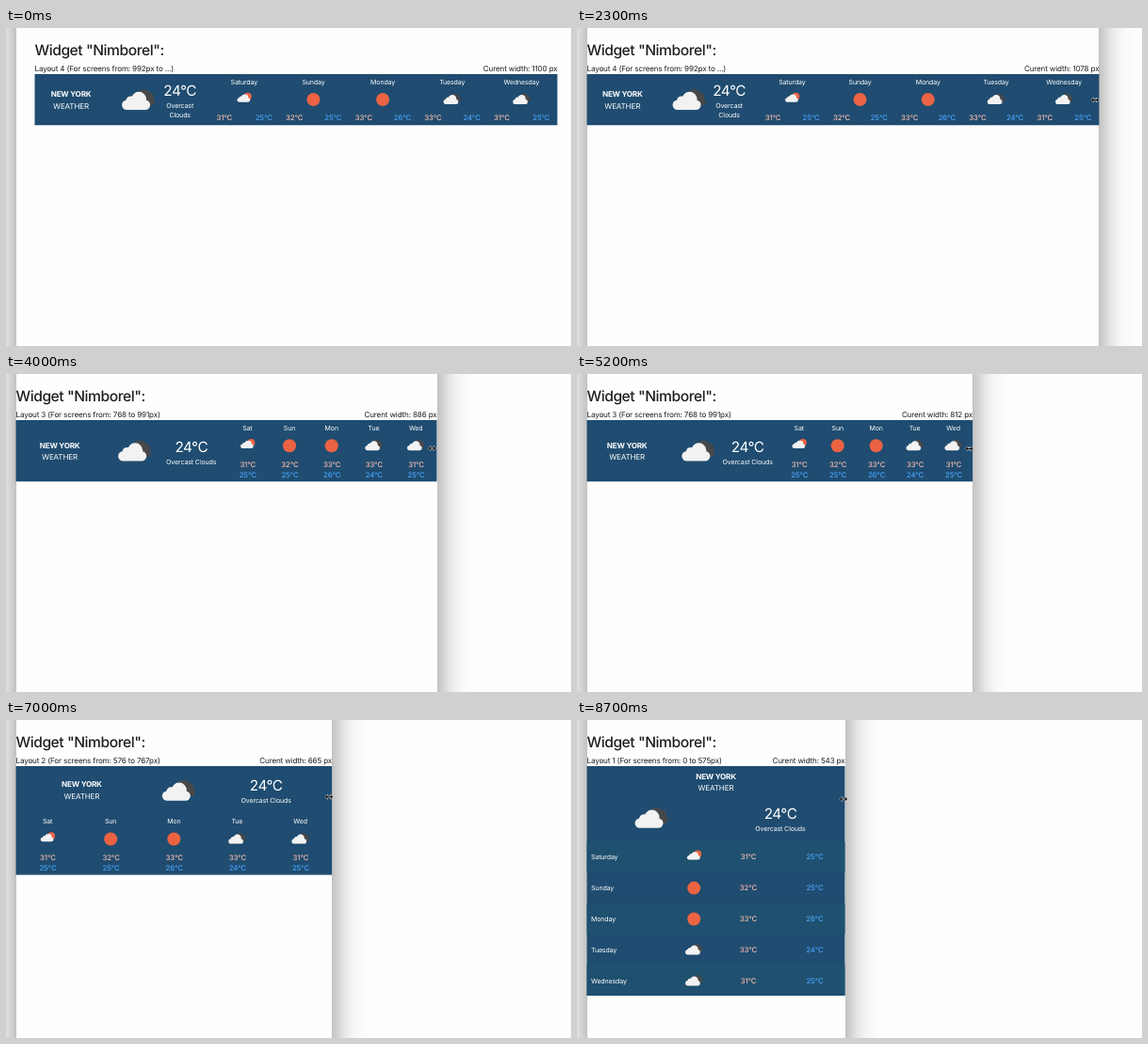
Write an HTML page that moves like this. It is 600x338 px and loops after 8.8 s.

```html
<!DOCTYPE html>
<html lang="en">
<head>
<meta charset="utf-8">
<title>Responsive weather widget</title>
<style>
  html, body { margin: 0; width: 100%; height: 100%; overflow: hidden; background: #fdfdfd; }
  #stage { position: relative; width: 100%; height: 100%; overflow: clip; contain: strict; }
  #page { position: absolute; left: 10.5px; top: -60px; bottom: -60px; background: #fefefe; box-shadow: 0 0 30px rgba(0, 0, 0, .47); }
  svg { position: absolute; left: 0; top: 0; width: 600px; height: 338px; }
  text { font-family: Inter, "Noto Sans", sans-serif; letter-spacing: -.018em; text-rendering: geometricPrecision; white-space: pre; }
  .title { font-size: 15.6px; font-weight: 550; letter-spacing: -.028em; fill: #1b1e21; }
  .note { font-size: 8.07px; fill: #1b1e21; }
  .city { font-size: 8.07px; font-weight: 700; letter-spacing: -.024em; fill: #fff; }
  .sub { font-size: 8.07px; fill: #fff; }
  .now { font-size: 15.4px; letter-spacing: -.035em; fill: #fff; }
  .sky { font-size: 7.06px; fill: #fff; }
  .day { font-size: 7px; fill: #fff; }
  .high { font-size: 7.8px; font-weight: 500; fill: #f6bbae; }
  .low { font-size: 7.8px; font-weight: 500; fill: #48a2fa; }
</style>
</head>
<body>
<div id="stage">
<div id="page"></div>
<svg viewBox="0 0 600 338">
  <defs>
    <g id="white" fill="#f2f2f2">
      <rect x="-17.5" y=".6" width="30" height="10.4" rx="5.2"/>
      <circle cx=".5" cy="-.2" r="8"/>
      <circle cx="-8" cy="1.4" r="5"/>
    </g>
    <g id="clouds" transform="translate(0 -1)">
      <g fill="#47484a">
        <rect x="-5" y="-2.5" width="22.5" height="9" rx="4.5"/>
        <circle cx="5.5" cy="-4" r="7"/>
        <circle cx="11.5" cy="-3" r="4.6"/>
      </g>
      <use href="#white"/>
    </g>
    <circle id="sun" cy=".3" r="7" fill="#eb6343"/>
    <g id="partly">
      <circle cx="4" cy="-3" r="4" fill="#eb6343"/>
      <use href="#white" transform="translate(.7 -1.7) scale(.46 .43)"/>
    </g>
    <use id="small" href="#clouds" transform="translate(0 .2) scale(.52)"/>
    <path id="cursor" d="M-4.2 0 L-1.6 -2.4 V-.5 H1.6 V-2.4 L4.2 0 L1.6 2.4 V.5 H-1.6 V2.4 Z"
      fill="#111" stroke="#fff" stroke-width=".9" paint-order="stroke" stroke-linejoin="round"/>
  </defs>
  <g id="view"></g>
</svg>
</div>
<script>
const LOOP = 8800, STEP = 100, LEFT = 10.5, MAX_W = 555, PX = 1100 / MAX_W;

// time, right window edge, cursor offset from that edge, cursor y
const drag = [
  [0, 605.5, 14, 72], [300, 605.5, 6, 72], [900, 601, -4, 72.5], [1200, 588, -5, 73],
  [1500, 571.5, -5, 73], [1800, 565, -4.5, 75], [2700, 546, -4, 77.5], [3100, 530.7, -3.5, 78],
  [3600, 494, -4.5, 78.5], [4000, 457.5, -5, 79], [4500, 438, -4, 79], [5400, 415, -3.5, 79.5],
  [6200, 373.4, -3, 80.5], [6300, 371, -3, 80.5], [7200, 339, -3, 82], [7900, 321.4, -3.5, 83.5],
  [8100, 306, -3, 83.5], [8700, 284.5, -1.5, 84], [8800, 284.5, -1.5, 84]
];

const days = [
  ["Saturday", "partly", 31, 25], ["Sunday", "sun", 32, 25], ["Monday", "sun", 33, 26],
  ["Tuesday", "small", 33, 24], ["Wednesday", "small", 31, 25]
];

// head: share of the width used by the header; city and temp: centres within it
const layouts = [
  { id: 4, min: 992, range: "992px to ...", bottom: 103.3, head: 1 / 3, city: 5 / 24, temp: 5 / 6, cityY: 70.5, cloudY: 77, tempY: 66.5 },
  { id: 3, min: 768, range: "768 to 991px", bottom: 114.3, head: 1 / 2, city: 5 / 24, temp: 5 / 6, cityY: 75.8, cloudY: 82.5, tempY: 77, daysX: .5, dayY: 57 },
  { id: 2, min: 576, range: "576 to 767px", bottom: 164.6, head: 1, city: 5 / 24, temp: 19 / 24, cityY: 68.5, cloudY: 75.8, tempY: 69.5, daysX: 0, dayY: 107.3 },
  { id: 1, min: 0, range: "0 to 575px", bottom: 293, head: 1, city: .5, temp: .75, cityY: 60.2, cloudY: 104.8, tempY: 99 }
];

const sizes = { title: 15.6, note: 8.07, city: 8.07, sub: 8.07, now: 15.4, sky: 7.06, day: 7, high: 7.8, low: 7.8 };
const view = document.getElementById("view");
const page = document.getElementById("page");

// y is the middle of the capitals
const text = (cls, x, y, str, anchor = "middle") =>
  `<text class="${cls}" x="${x}" y="${y + sizes[cls] * .36}" text-anchor="${anchor}">${str}</text>`;
const icon = (id, x, y) => `<use href="#${id}" transform="translate(${x} ${y})"/>`;
const rect = (x, y, w, h, fill) => `<rect x="${x}" y="${y}" width="${w}" height="${h}" fill="${fill}"/>`;

function sample(t) {
  const i = drag.findIndex(row => row[0] > t);
  const a = drag[i - 1], b = drag[i];
  const p = (t - a[0]) / (b[0] - a[0]);
  return a.slice(1).map((v, k) => v + (b[k + 1] - v) * p);
}

function header(l, x, w) {
  const hw = w * l.head;
  const cityX = x + hw * l.city, tempX = x + hw * l.temp;
  const cloudX = l.id === 1 ? x + w * .25 : x + hw * 5 / 12 + 33;
  const sky = l.id === 4
    ? text("sky", tempX, 82.6, "Overcast") + text("sky", tempX, 92.7, "Clouds")
    : text("sky", tempX, l.tempY + 16, "Overcast Clouds");
  return text("city", cityX, l.cityY, "NEW YORK") + text("sub", cityX, l.cityY + 12.1, "WEATHER") +
    icon("clouds", cloudX, l.cloudY) + text("now", tempX, l.tempY, "24°C") + sky;
}

function forecast(l, x, w) {
  return days.map(([name, pic, hi, lo], i) => {
    const high = hi + "°C", low = lo + "°C";
    if (l.id === 4) {
      const col = w * 2 / 15, cx = x + w * .4 + .3 + i * w * .1327;
      return text("day", cx, 57, name) + icon(pic, cx, 75.7) +
        text("high", cx - col / 2 + 7.6, 95.6, high, "start") +
        text("low", cx + col / 2 - 7, 95.6, low, "end");
    }
    if (l.id === 1) {
      const y = 145.6 + i * 32.9;
      return text("day", x + 4.5, y, name, "start") + icon(pic, x + w * .415, y - .2) +
        text("high", x + w * .626, y, high) + text("low", x + w * .883, y, low);
    }
    const col = w * (1 - l.daysX) / 5, cx = x + w * l.daysX + col * (i + .5);
    return text("day", cx, l.dayY, name.slice(0, 3)) + icon(pic, cx, l.dayY + 18.9) +
      text("high", cx + .4, l.dayY + 38.7, high) + text("low", cx + .4, l.dayY + 49.7, low);
  }).join("");
}

function render(t) {
  const [right, dx, cursorY] = sample(t);
  const span = right - LEFT, w = Math.min(MAX_W, span), x = LEFT + (span - w) / 2;
  const px = Math.round(w * PX);
  const l = layouts.find(item => px >= item.min);
  const rows = l.id === 1
    ? [0, 2, 4].map(i => rect(x, 129.5 + i * 32.7, w, 32.7, "#1f506f")).join("") : "";

  page.style.width = span + "px";
  view.innerHTML =
    text("title", x, 23.8, 'Widget "Nimborel":', "start") +
    text("note", x, 43.2, `Layout ${l.id} (For screens from: ${l.range})`, "start") +
    text("note", x + w, 43.2, `Curent width: ${px} px`, "end") +
    rect(x, 49, w, l.bottom - 49, "#1f4c70") + rows +
    header(l, x, w) + forecast(l, x, w) +
    icon("cursor", right + dx, cursorY);
}

let shown = -1;
function tick() {
  const t = Math.floor(performance.now() % LOOP / STEP) * STEP;
  if (t !== shown) render(shown = t);
  requestAnimationFrame(tick);
}
tick();
</script>
</body>
</html>
```
